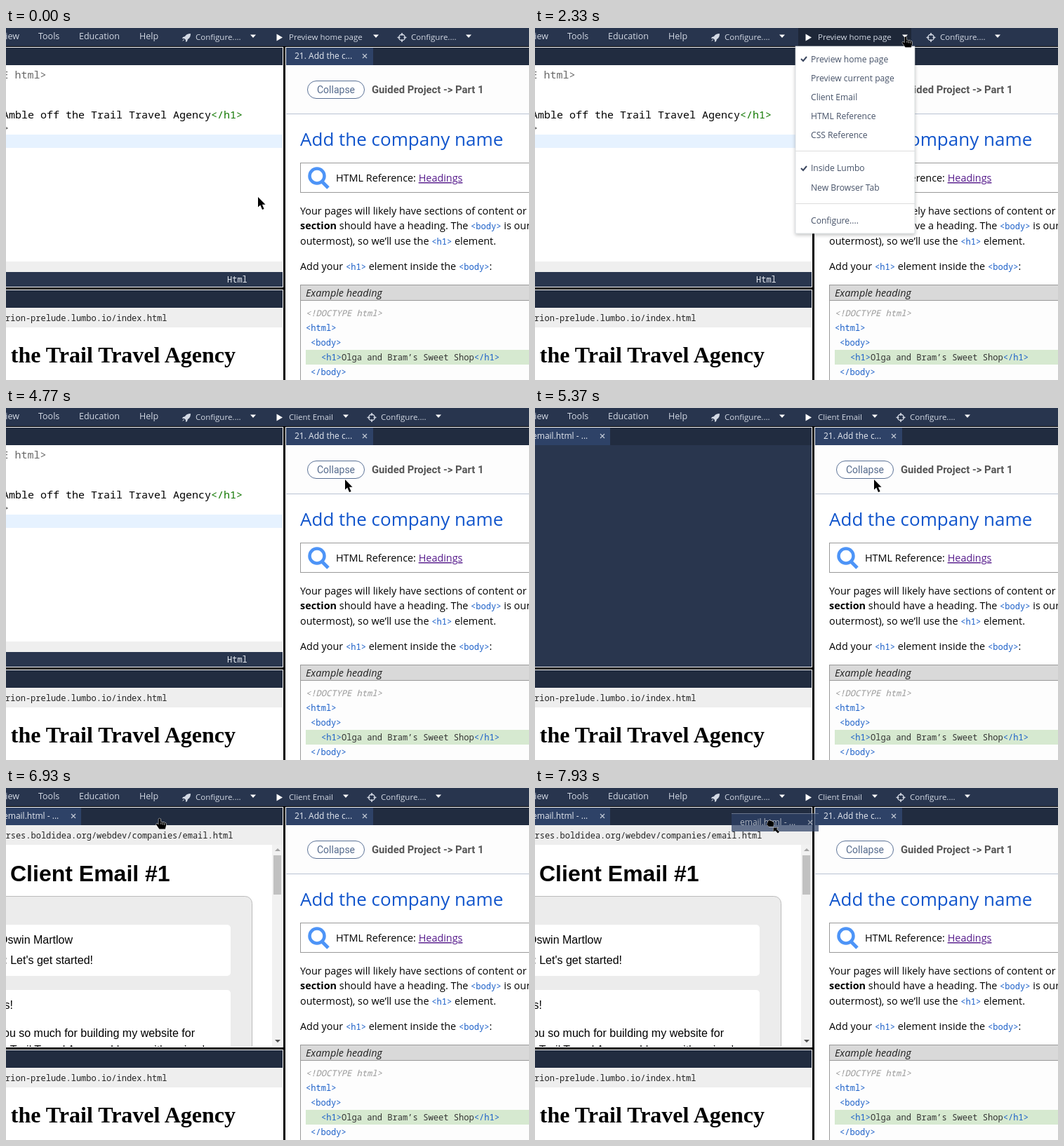
An HTML page that plays this animation: 745x502 px, repeating every 8000 ms.

```html
<!DOCTYPE html>
<html lang="en">
<head>
<meta charset="utf-8">
<title>Preview menu</title>
<style>
html, body { margin: 0; width: 100%; height: 100%; overflow: hidden; background: #000; }
svg { display: block; font: 12px "Open Sans", sans-serif; }
.end { text-anchor: end; }
.bar { fill: #d3d9e4; font-size: 11.5px; }
.menus { fill: #d3d9e4; font-size: 12.5px; }
.tab { fill: #e6eaf1; }
.x { stroke: #c3cad6; stroke-width: 1.2; fill: none; }
.mono { font-family: "Noto Sans Mono", monospace; }
.src { font-size: 15px; }
.body { font-size: 14.4px; }
.sample, .body .mono { font-size: 12.1px; }
.tag { fill: #1a5fc8; }
.mail { font: 16px "Liberation Sans", Arial, sans-serif; }
.cursor { fill: #000; stroke: #fff; stroke-width: 1; paint-order: stroke; }
</style>
</head>
<body>
<svg width="745" height="502" viewBox="0 0 745 502">
  <defs>
    <path id="close" class="x" d="M-3-3 3 3M3-3-3 3"/>
    <path id="drop" d="M-4-2.5h8l-4 4.5z" fill="#fff"/>
    <path id="check" d="M-4 0-1 3 4-3" fill="none" stroke="#3c4860" stroke-width="2"/>
    <clipPath id="pane"><rect y="28" width="394" height="341"/></clipPath>
    <linearGradient id="blue" x2="0" y2="1">
      <stop stop-color="#3b7bea"/><stop offset="1" stop-color="#2062e4"/>
    </linearGradient>
    <filter id="shadow" x="-10%" y="-10%" width="120%" height="120%">
      <feDropShadow dx="0" dy="2" stdDeviation="2.5" flood-opacity=".25"/>
    </filter>
  </defs>

  <!-- editor -->
  <rect y="27" width="395" height="343" fill="#fff"/>
  <rect y="28" width="394" height="25" fill="#212c40"/>
  <g id="editor">
    <rect y="152" width="394" height="19" fill="#e6f2ff"/>
    <rect y="333" width="394" height="15" fill="#efefef"/>
    <rect y="348" width="394" height="21" fill="#29364e"/>
    <g class="mono src end">
      <text x="57.500" y="72" fill="#666">&lt;!DOCTYPE html&gt;</text>
      <text x="337" y="129">Amble off the Trail Travel Agency<tspan fill="#170">&lt;/h1&gt;</tspan></text>
      <text x="4" y="148" fill="#555">&gt;</text>
    </g>
    <text class="mono" x="315" y="363" fill="#e8ecf2">Html</text>
  </g>

  <!-- mail page -->
  <g id="mail" clip-path="url(#pane)">
    <rect y="53" width="394" height="317" fill="#29364e"/>
    <rect id="strip" y="28" width="394" height="25" fill="#3b4f76"/>
    <rect id="mailTab" y="28" width="107" height="25" fill="#2e4267"/>
    <g id="tabText"><text class="tab" x="-4" y="44">email.html - ...</text><use href="#close" x="96" y="40"/></g>
    <g id="page">
      <rect y="53" width="394" height="28" fill="#eee"/>
      <text class="mono end" x="323.500" y="72" fill="#222">https://courses.boldidea.org/webdev/companies/email.html</text>
      <rect y="81" width="394" height="289" fill="#fff"/>
      <rect x="-20" y="154.500" width="370.500" height="240" rx="10" fill="#ececec" stroke="#bbb"/>
      <rect x="-20" y="195" width="340" height="73" rx="5" fill="#fff"/>
      <rect x="-20" y="288" width="340" height="100" rx="5" fill="#fff"/>
      <g class="mail">
        <text x="6" y="133" font-size="32" font-weight="700">Client Email #1</text>
        <g class="end">
          <text x="95" y="222">Oswin Martlow</text>
          <text x="124" y="251"><tspan font-weight="700">Subject:</tspan> Let's get started!</text>
          <text x="10" y="315">Greetings!</text>
          <text x="269" y="355">Thank you so much for building my website for</text>
          <text x="292" y="379">Amble off the Trail Travel Agency. I know with a simple</text>
        </g>
      </g>
      <rect x="379" y="81" width="15" height="289" fill="#f1f1f1"/>
      <rect x="381" y="96" width="11" height="56" fill="#c1c1c1"/>
      <path d="M383 90h8l-4-4z" fill="#a3a3a3"/>
      <path d="M383 359h8l-4 4z" fill="#505050"/>
    </g>
  </g>

  <!-- preview -->
  <rect y="373" width="395" height="129" fill="#fff"/>
  <rect y="374" width="394" height="25" fill="#212c40"/>
  <rect y="399" width="394" height="28" fill="#eee"/>
  <text class="mono end" x="229.500" y="418" fill="#222">rion-prelude.lumbo.io/index.html</text>
  <text class="end" x="327" y="477" font-family="Liberation Serif, Times, serif" font-size="32" font-weight="700">Amble off the Trail Travel Agency</text>

  <!-- guide -->
  <rect x="398" y="27" width="347" height="475" fill="#fff"/>
  <rect x="399" y="28" width="346" height="25" fill="#212c40"/>
  <rect x="399" y="28" width="124" height="25" fill="#2e4267"/>
  <text class="tab" x="411" y="44">21. Add the c...</text>
  <use href="#close" x="511" y="40"/>
  <rect x="399" y="53" width="346" height="69" fill="#fdfdfd"/>
  <path d="M399 122.500H745" stroke="#b9c3d3"/>
  <rect id="collapse" x="429.500" y="75.500" width="81" height="25" rx="12.500" stroke="#5a7196"/>
  <g font-family="Roboto, sans-serif">
    <text x="443" y="93" font-size="14" fill="#546a8c">Collapse</text>
    <text x="521" y="93" font-size="14.800" font-weight="700" fill="#555">Guided Project -&gt; Part 1</text>
  </g>
  <text x="419" y="168" font-size="26" fill="#1155cc">Add the company name</text>
  <rect x="419.500" y="192.500" width="340" height="42" fill="#fff" stroke="#999"/>
  <g fill="none" stroke="#4d94f7">
    <circle cx="443" cy="211" r="10.500" stroke-width="4.500"/>
    <path d="M450 219l9 9" stroke-width="5"/>
  </g>
  <g class="body">
    <text x="470" y="219">HTML Reference: <tspan fill="#551a8b" text-decoration="underline">Headings</tspan></text>
    <text x="419" y="266">Your pages will likely have sections of content or</text>
    <text x="419" y="287"><tspan font-weight="700">section</tspan> should have a heading. The <tspan class="mono tag">&lt;body&gt;</tspan> is our</text>
    <text x="419" y="309">outermost), so we’ll use the <tspan class="mono tag">&lt;h1&gt;</tspan> element.</text>
    <text x="419" y="345">Add your <tspan class="mono tag">&lt;h1&gt;</tspan> element inside the <tspan class="mono tag">&lt;body&gt;</tspan>:</text>
  </g>
  <rect x="419.500" y="366.500" width="340" height="150" fill="#fdfdfd" stroke="#999"/>
  <rect x="419.500" y="366.500" width="340" height="22" fill="#d9d9d9" stroke="#999"/>
  <text x="427" y="383" font-size="14.400" font-style="italic" fill="#222">Example heading</text>
  <rect x="427" y="459" width="318" height="21" fill="#d6e9d0"/>
  <g class="mono sample tag">
    <text x="427" y="411" font-style="italic" style="fill:#999">&lt;!DOCTYPE html&gt;</text>
    <text x="427" y="432">&lt;html&gt;</text>
    <text x="434" y="453">&lt;body&gt;</text>
    <text x="449" y="474">&lt;h1&gt;<tspan fill="#333">Olga and Bram’s Sweet Shop</tspan>&lt;/h1&gt;</text>
    <text x="434" y="495">&lt;/body&gt;</text>
  </g>

  <!-- top bar -->
  <rect width="745" height="26" fill="#28354e"/>
  <rect id="hover" x="375" width="161" height="26" fill="#1e2738"/>
  <g class="menus">
    <text class="end" x="19" y="16">View</text>
    <text x="46" y="16">Tools</text>
    <text x="104" y="16">Education</text>
    <text x="190" y="16">Help</text>
  </g>
  <g class="bar">
    <path d="M263 8q-6 0-8 4l-3 1-1 2 3 0 2 2 0 3 2-1 1-3q4-2 4-8zM253 16l-2 3 3-2z"/>
    <text x="270" y="17">Configure....</text>
    <use href="#drop" x="352" y="12"/>
    <path d="M385.500 8.500v10l8.500-5z" fill="#fff"/>
    <text id="target" x="403" y="17"></text>
    <g id="rest">
      <use href="#drop" x="527" y="12"/>
      <path d="M564 7v4M564 16v4M557.500 13.500h4M566.500 13.500h4" stroke="#d3d9e4" stroke-width="1.500"/>
      <circle cx="564" cy="13.500" r="4.300" fill="none" stroke="#d3d9e4" stroke-width="1.500"/>
      <text x="577" y="17">Configure....</text>
      <use href="#drop" x="659" y="12"/>
    </g>
  </g>

  <g id="menu">
    <rect x="371" y="26" width="170" height="267" fill="#fff" stroke="#c4c8ce" stroke-width=".6" filter="url(#shadow)"/>
    <rect id="mark" x="371" width="170" height="27" fill="url(#blue)"/>
    <path d="M371 175.500H541M371 250.500H541" stroke="#ddd"/>
    <use href="#check" x="383" y="44"/>
    <use href="#check" x="383" y="200"/>
    <g id="items" font-size="12.100"></g>
  </g>

  <g id="ghost" opacity=".72">
    <rect x="-16" y="27" width="124" height="26" fill="#2e4267"/>
    <path d="M-16 27.500H108" stroke="#8592aa"/>
    <text class="tab" x="-4" y="44">email.html - ...</text>
    <use href="#close" x="96" y="40"/>
  </g>

  <g id="cursor" class="cursor">
    <path id="arrow" d="M0 0V14.500L3.300 11.500 6 18 8.600 17 5.900 10.700H10.500z"/>
    <g id="hand">
      <path d="M-1.500 0Q0-1.500 1.500 0V4L8 5.500Q9.500 6 9.500 8L8 14.500H-.5L-5 8 -4 6.500-1.500 8z"/>
      <path d="M2 5v3M4.500 5.500v3M7 6v3" stroke-width=".7"/>
    </g>
    <g id="grab">
      <path d="M1 4 2 1 4 0 9 2 10.500 4 9.500 9H3L0 6z"/>
      <path d="M9.500 10.500h6.500l-2 2 4 4-2 2-4-4-2.500 2z"/>
    </g>
  </g>
</svg>
<script>
const LOOP = 8000;
const $ = id => document.getElementById(id);
const show = (id, on) => { $(id).style.display = on ? "" : "none"; };
const move = (id, x, y) => $(id).setAttribute("transform", `translate(${x} ${y})`);

// [time, x, y]
const pointer = [
  [0, 359, 241], [710, 359, 241], [830, 390, 214], [1200, 390, 214],
  [1450, 442, 105], [1670, 528, 13], [3080, 528, 13], [3300, 494, 74], [3570, 483, 102],
  [6430, 483, 102], [6430, 432, 83], [6500, 334, 47], [6930, 334, 47], [6930, 220, 44],
  [7100, 22, 39], [7430, 22, 39], [7430, 40, 38], [7530, 62, 37], [7720, 190, 40],
  [7930, 330, 46], [LOOP, 330, 46]
];
const dragged = [[7430, 0, 0], [7530, 12, 3], [7720, 146, 4], [7930, 296, 9], [LOOP, 296, 9]];

function at(keys, t) {
  let i = keys.length - 2;
  while (i > 0 && keys[i][0] > t) i--;
  const [t0, x0, y0] = keys[i], [t1, x1, y1] = keys[i + 1];
  const u = Math.max(0, (t - t0) / (t1 - t0));
  return [x0 + (x1 - x0) * u, y0 + (y1 - y0) * u];
}

const rows = [
  ["Preview home page", 49], ["Preview current page", 76], ["Client Email", 103],
  ["HTML Reference", 130], ["CSS Reference", 157], ["Inside Lumbo", 204],
  ["New Browser Tab", 232], ["Configure....", 279]
];
$("items").innerHTML = rows.map(([s, y]) => `<text x="393" y="${y}">${s}</text>`).join("");
const items = [...$("items").children];

function draw(t) {
  const [x, y] = at(pointer, t);
  const chosen = t >= 4770, dragging = t >= 7430;
  const open = t >= 2110 && !chosen;
  const overButton = t > 1230 && !chosen && (open || y < 26);
  const overStrip = t >= 7450 && t < 7880;

  show("hover", overButton);
  show("menu", open);
  $("menu").style.opacity = Math.min(1, (t - 2090) / 240);
  const row = open && y > 31 ? Math.floor((y - 31) / 27) : -1;
  show("mark", row >= 0);
  $("mark").setAttribute("y", 31 + row * 27);
  items.forEach((el, i) => el.setAttribute("fill", i === row ? "#fff" : "#465268"));

  $("target").textContent = chosen ? "Client Email" : "Preview home page";
  move("rest", chosen ? -43 : 0, 0);

  show("editor", t < 5370);
  show("mail", t >= 5370);
  show("page", t >= 5600);
  show("strip", overStrip);
  show("mailTab", !overStrip);
  $("tabText").style.opacity = overStrip ? 0.35 : 1;
  $("collapse").setAttribute("fill", t >= 6430 && t < 6930 ? "#eef2f8" : "#fff");

  show("ghost", dragging);
  move("ghost", ...at(dragged, t));

  const hand = overButton || (t >= 6930 && !dragging);
  show("arrow", !hand && !dragging);
  show("hand", hand);
  show("grab", dragging);
  move("cursor", x, y);
}

function tick() {
  draw(performance.now() % LOOP);
  requestAnimationFrame(tick);
}
tick();
</script>
</body>
</html>
```
